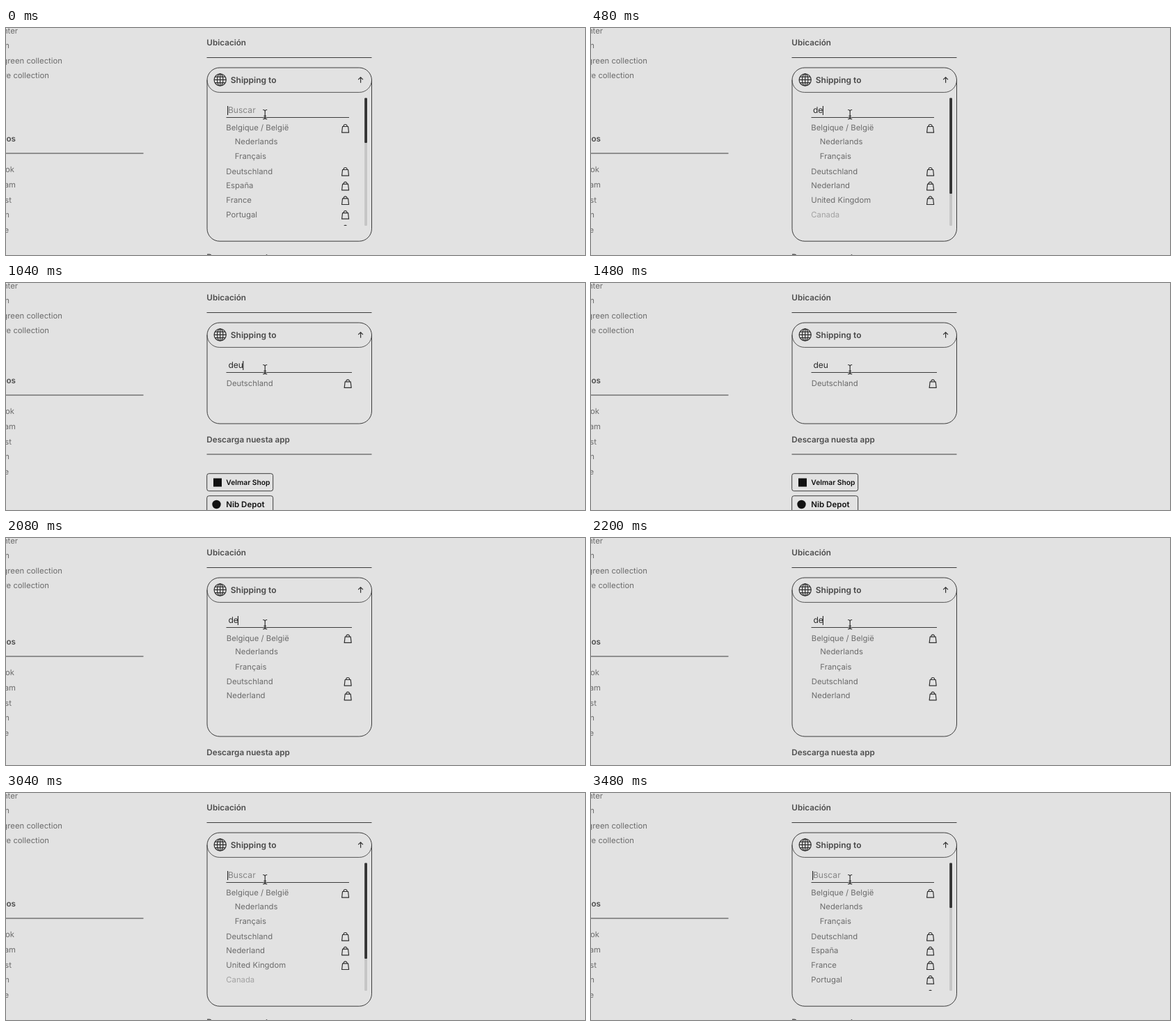
An HTML page that plays this animation: 832 by 326 pixels, repeating every 3.56 s.

```html
<!DOCTYPE html>
<html lang="es">
<head>
<meta charset="utf-8">
<title>Country search</title>
<style>
  html, body { margin: 0; width: 100%; height: 100%; overflow: hidden; background: #e2e2e2; }
  svg { display: block; width: 832px; height: 326px; }
  text { font: 400 11.3px Inter, "Open Sans", sans-serif; fill: #6b6b6b; text-rendering: geometricPrecision; }
  .head { font-size: 11.7px; font-weight: 600; fill: #4d4d4d; }
  .title { font-size: 12px; font-weight: 600; fill: #484848; }
  .query { font-size: 12.1px; fill: #2c2c2c; }
  .hint { fill: #858585; }
  .off { fill: #a2a2a2; }
  .end { text-anchor: end; }
  .store { font-weight: 600; fill: #111; }
  .line { fill: none; stroke: #3c3c3c; stroke-width: 1; }
  .icon { fill: none; stroke: #303030; stroke-width: 1.2; }
</style>
</head>
<body>
<svg viewBox="0 0 832 326">
  <defs>
    <clipPath id="view"><rect x="300" y="132" width="210" height="152"/></clipPath>
    <g id="bag" class="icon" stroke-linejoin="round">
      <path d="M-4-3H4L5 5.6H-5Z"/>
      <path d="M-2.6-3C-2.6-7 2.6-7 2.6-3"/>
    </g>
  </defs>

  <g class="end" id="links"></g>
  <g id="social">
    <text class="head end" x="14" y="163">os</text>
    <path class="line" d="M0 180H197.5"/>
  </g>

  <text class="head" x="288.3" y="25.4">Ubicación</text>
  <path class="line" d="M288.5 42.5H525.5"/>

  <rect class="line" id="panel" x="289" y="57" width="236.5" rx="18"/>
  <path class="line" stroke-opacity=".85" d="M289 74.7A17.7 17.7 0 0 0 306.7 92.4H507.8A17.7 17.7 0 0 0 525.5 74.7"/>
  <g class="icon" transform="translate(307.7 74.4)">
    <circle r="8.6"/>
    <ellipse rx="4.2" ry="8.6"/>
    <path d="M0-8.6V8.6M-8.6 0H8.6M-7.4-4.2H7.4M-7.4 4.2H7.4"/>
  </g>
  <text class="title" x="322.8" y="78.7">Shipping to</text>
  <path class="icon" d="M509.6 78.8V71M506.2 74.2L509.6 70.8L513 74.2"/>

  <text id="query" y="122.2"></text>
  <path class="line" id="rule"/>
  <path id="caret" stroke="#222" stroke-width="1.1"/>
  <g clip-path="url(#view)" id="list"></g>
  <g id="bar">
    <rect x="515.2" y="100.5" width="3.8" height="183.5" rx="1" fill="#c5c5c5"/>
    <rect id="thumb" x="515.2" y="100.5" width="3.8" rx="1" fill="#333"/>
  </g>

  <g id="below">
    <text class="head" x="288.3" y="27">Descarga nuesta app</text>
    <path class="line" d="M288.5 44H525.5"/>
    <rect class="line" x="288.7" y="71.7" width="95" height="25" rx="3"/>
    <rect x="298" y="78.5" width="12" height="12" fill="#111"/>
    <text class="store" x="316.3" y="88.3" font-size="10.3" style="font-size:10.3px">Velmar Shop</text>
    <rect class="line" x="288.7" y="103.7" width="95" height="25" rx="3"/>
    <circle cx="302.5" cy="116" r="6.2" fill="#111"/>
    <text class="store" x="316.3" y="120.3" style="font-size:11.5px">Nib Depot</text>
  </g>

  <path fill="none" stroke="#222" stroke-width="1.1"
    d="M369.2 117.5Q372.2 117.5 372.2 119.5Q372.2 117.5 375.2 117.5M372.2 119V129.5M369.2 130.8Q372.2 130.8 372.2 129Q372.2 130.8 375.2 130.8M370.4 126.3H374"/>
</svg>
<script>
const LOOP = 3560;
const $ = id => document.getElementById(id);

const countries = [
  { name: 'Belgique / België', kids: ['Nederlands', 'Français'] },
  ...['Deutschland', 'España', 'France', 'Portugal', 'Nederland', 'United Kingdom'].map(name => ({ name })),
  { name: 'Canada', off: true }
];

// Text typed in the field; results follow a little later.
const typed = [[0, ''], [280, 'd'], [480, 'de'], [920, 'deu'], [1960, 'de'], [2360, 'd'], [3040, '']];
const found = [[0, ''], [400, 'd'], [600, 'de'], [1040, 'deu'], [2080, 'de'], [2480, 'd'], [3160, '']];
const caretX = [318.6, 326, 333.4, 340.8];
const caretOff = t => t >= 1480 && t < 1960;

// Layout by length of the active filter.
const layouts = [
  { bottom: 306.2, shift: 0, thumb: 64.5 },
  { bottom: 306.2, shift: 0, thumb: 137.5 },
  { bottom: 285, shift: -10 },
  { bottom: 202, shift: -19 }
];

const valueAt = (steps, t) => steps.filter(s => s[0] <= t).pop()[1];
const move = (id, y) => $(id).setAttribute('transform', `translate(0 ${y})`);
const label = (x, y, text, cls = '') => `<text class="${cls}" x="${x}" y="${y}">${text}</text>`;
const has = (name, q) => name.toLowerCase().includes(q);

$('links').innerHTML = [['nter', 17, 7.5], ['n', 5, 29], ['green collection', 81, 50.5], ['re collection', 62, 72.2]]
  .map(([s, x, y]) => label(x, y, s, 'end')).join('');
$('social').innerHTML += [['ok', 12], ['am', 14], ['st', 8], ['n', 5], ['e', 4]]
  .map(([s, x], i) => label(x, 207.2 + i * 21.7, s, 'end')).join('');

function drawList(q) {
  const scroll = q.length < 2;
  const x = scroll ? 316.3 : 316.8;
  const bagX = scroll ? 487.6 : 491.2;
  let y = scroll ? 143 : 144;
  let out = '';
  for (const { name, kids = [], off } of countries) {
    if (![name, ...kids].some(n => has(n, q))) continue;
    out += label(x, y + 4, name, off ? 'off' : '');
    if (!off) out += `<use href="#bag" x="${bagX}" y="${y + (kids.length && scroll ? 1.5 : .8)}"/>`;
    if (kids.length) {
      kids.forEach((kid, i) => out += label(x + 12.5, (scroll ? 166.5 : 167.2) + i * 21.6, kid));
      y = 205.7;
    } else y += 20.7;
  }
  $('list').innerHTML = out;
}

function drawLayout(q) {
  const { bottom, shift, thumb } = layouts[q.length];
  $('panel').setAttribute('height', bottom - 57);
  $('rule').setAttribute('d', `M316.5 128.5H${thumb ? 493 : 497}`);
  $('bar').style.display = thumb ? '' : 'none';
  if (thumb) $('thumb').setAttribute('height', thumb);
  move('social', shift);
  move('below', bottom);
}

let shown = null;
function draw(t) {
  const text = valueAt(typed, t);
  const q = valueAt(found, t);
  if (q !== shown) {
    drawList(q);
    drawLayout(q);
    shown = q;
  }
  const query = $('query');
  query.textContent = text || 'Buscar';
  query.setAttribute('class', text ? 'query' : 'query hint');
  query.setAttribute('x', q.length > 1 ? 319.4 : 318.9);
  $('caret').setAttribute('d', `M${caretX[text.length]} 112V125`);
  $('caret').style.display = caretOff(t) ? 'none' : '';
}

const start = performance.now();
function tick() {
  draw((performance.now() - start) % LOOP);
  requestAnimationFrame(tick);
}
tick();
</script>
</body>
</html>
```
